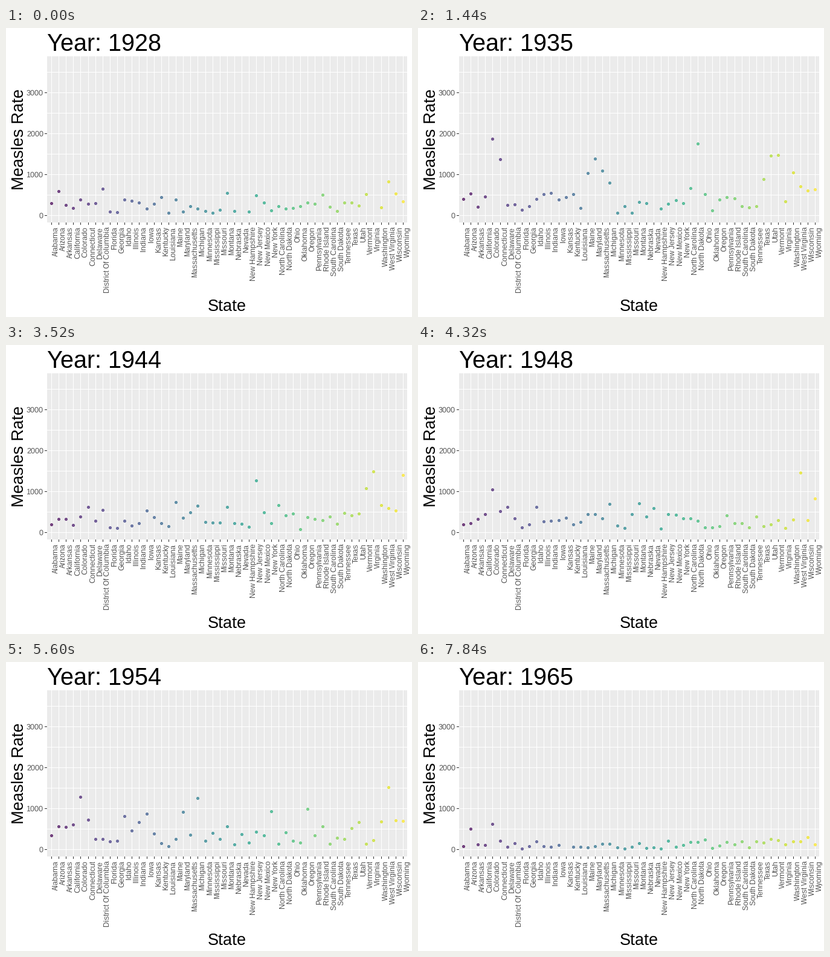
Recreate the animation shown at these times as a matplotlib script. Size 672 by 480 pixels, loop 8000 ms.

```python
import numpy as np
import matplotlib.pyplot as plt
from matplotlib.animation import FuncAnimation

W, H, DPI = 672, 480, 96
PT = 72 / DPI
FRAMES, STEP = 50, 160
FIRST, LAST = 1928, 1965
YEARS_PER_FRAME = 74 / 99
LEFT, RIGHT, TOP, BOTTOM = 68, 664, 47, 323
ZERO, SCALE = 311.5, 0.0681

STATES = """Alabama,Arizona,Arkansas,California,Colorado,Connecticut,Delaware,
District Of Columbia,Florida,Georgia,Idaho,Illinois,Indiana,Iowa,Kansas,Kentucky,
Louisiana,Maine,Maryland,Massachusetts,Michigan,Minnesota,Mississippi,Missouri,
Montana,Nebraska,Nevada,New Hampshire,New Jersey,New Mexico,New York,
North Carolina,North Dakota,Ohio,Oklahoma,Oregon,Pennsylvania,Rhode Island,
South Carolina,South Dakota,Tennessee,Texas,Utah,Vermont,Virginia,Washington,
West Virginia,Wisconsin,Wyoming""".replace("\n", "").split(",")

# States whose rates usually lie above or below the rest
HIGH = """Arizona,Colorado,Connecticut,Maine,Massachusetts,Michigan,Montana,
New Jersey,Oregon,Utah,Vermont,Washington,West Virginia,Wisconsin,
Wyoming""".replace("\n", "").split(",")
LOW = """Florida,Georgia,Louisiana,Minnesota,Mississippi,Missouri,Nebraska,
New Hampshire,Oklahoma,South Dakota""".replace("\n", "").split(",")

# Years without reports: before the first or after the last one
SINCE = {"Nevada": 1938, "Virginia": 1931}
UNTIL = {"Kansas": 1957}


def state_level(name):
    return 1.7 if name in HIGH else 0.4 if name in LOW else 1


def build_path():
    """Rate of every state in every frame: straight moves from year to year."""
    rng = np.random.default_rng(7)
    years = np.arange(FIRST, LAST + 1)
    typical = np.interp(years, [1928, 1935, 1948, 1954, 1960, 1965],
                        [290, 450, 330, 350, 210, 95])
    levels = np.array([state_level(s) for s in STATES])
    spread = np.exp(rng.normal(0, 0.6, (len(years), len(STATES))))
    rates = np.minimum(typical[:, None] * levels * spread, 2000)

    frames = np.arange(FRAMES)
    stops = np.minimum(np.rint((years - FIRST) / YEARS_PER_FRAME), FRAMES - 1)
    now = FIRST + frames * YEARS_PER_FRAME
    path = np.empty((FRAMES, len(STATES)))
    for k, name in enumerate(STATES):
        path[:, k] = np.interp(frames, stops, rates[:, k])
        absent = (now < SINCE.get(name, FIRST)) | (now > UNTIL.get(name, LAST))
        path[absent, k] = np.nan
    return path


path = build_path()
plt.rcParams.update({"font.family": "Liberation Sans",
                     "text.hinting": "native", "text.hinting_factor": 1})
fig = plt.figure(figsize=(W / DPI, H / DPI), dpi=DPI, facecolor="white")
ax = fig.add_axes([0, 0, 1, 1])
ax.set(xlim=(0, W), ylim=(H, 0))
ax.axis("off")


def text(x, y, s, px, color="black", **kw):
    return ax.text(x, y, s, fontsize=px * PT, color=color, va="baseline",
                   rotation_mode="anchor", **kw)


def line(x0, y0, x1, y1, color):
    # Coordinates already lie on pixel centres, so no snapping
    ax.plot([x0, x1], [y0, y1], color=color, lw=PT, snap=False,
            solid_capstyle="butt", zorder=2)


ax.add_patch(plt.Rectangle((LEFT, TOP), RIGHT - LEFT, BOTTOM - TOP,
                           color="#EBEBEB", lw=0, zorder=1))

# Pixel centre of each state's column
gap = (RIGHT + 0.6 - LEFT) / (len(STATES) + 0.2)
xs = np.floor(LEFT + 0.15 + gap * (0.6 + np.arange(len(STATES)))) + 0.5

for value in range(0, 4000, 500):
    y = np.floor(ZERO - value * SCALE) + 0.5
    line(LEFT, y, RIGHT, y, "white")
    if value % 1000 == 0:
        line(LEFT - 4, y, LEFT, y, "#333333")
        text(62, y + 4.5, str(value), 12, "#4D4D4D", ha="right")

for x, name in zip(xs, STATES):
    line(x, TOP, x, BOTTOM, "white")
    line(x, BOTTOM, x, BOTTOM + 4, "#333333")
    text(x + 10.5, 330, name, 12, "#4D4D4D", ha="right", rotation=90)

text((LEFT + RIGHT) / 2, 470, "State", 27, ha="center")
text(29, (TOP + BOTTOM) / 2, "Measles Rate", 27, ha="center", rotation=90)
title = text(LEFT, 38, "", 40)

colors = plt.cm.viridis(np.linspace(0, 1, len(STATES)))
colors[:, 3] = 0.7
dots = ax.scatter(xs, np.full(len(xs), ZERO), s=(4 * PT) ** 2,
                  facecolors=colors, edgecolors=colors,
                  linewidths=PT, zorder=3)


def draw(i):
    title.set_text(f"Year: {round(FIRST + i * YEARS_PER_FRAME)}")
    shown = ~np.isnan(path[i])
    ys = np.floor(ZERO - path[i] * SCALE) + 0.5
    dots.set_offsets(np.column_stack([xs, ys])[shown])
    dots.set_facecolors(colors[shown])
    dots.set_edgecolors(colors[shown])
    return title, dots


anim = FuncAnimation(fig, draw, frames=FRAMES, interval=STEP,
                     init_func=lambda: draw(0), repeat=True, repeat_delay=0)
plt.show()
```
